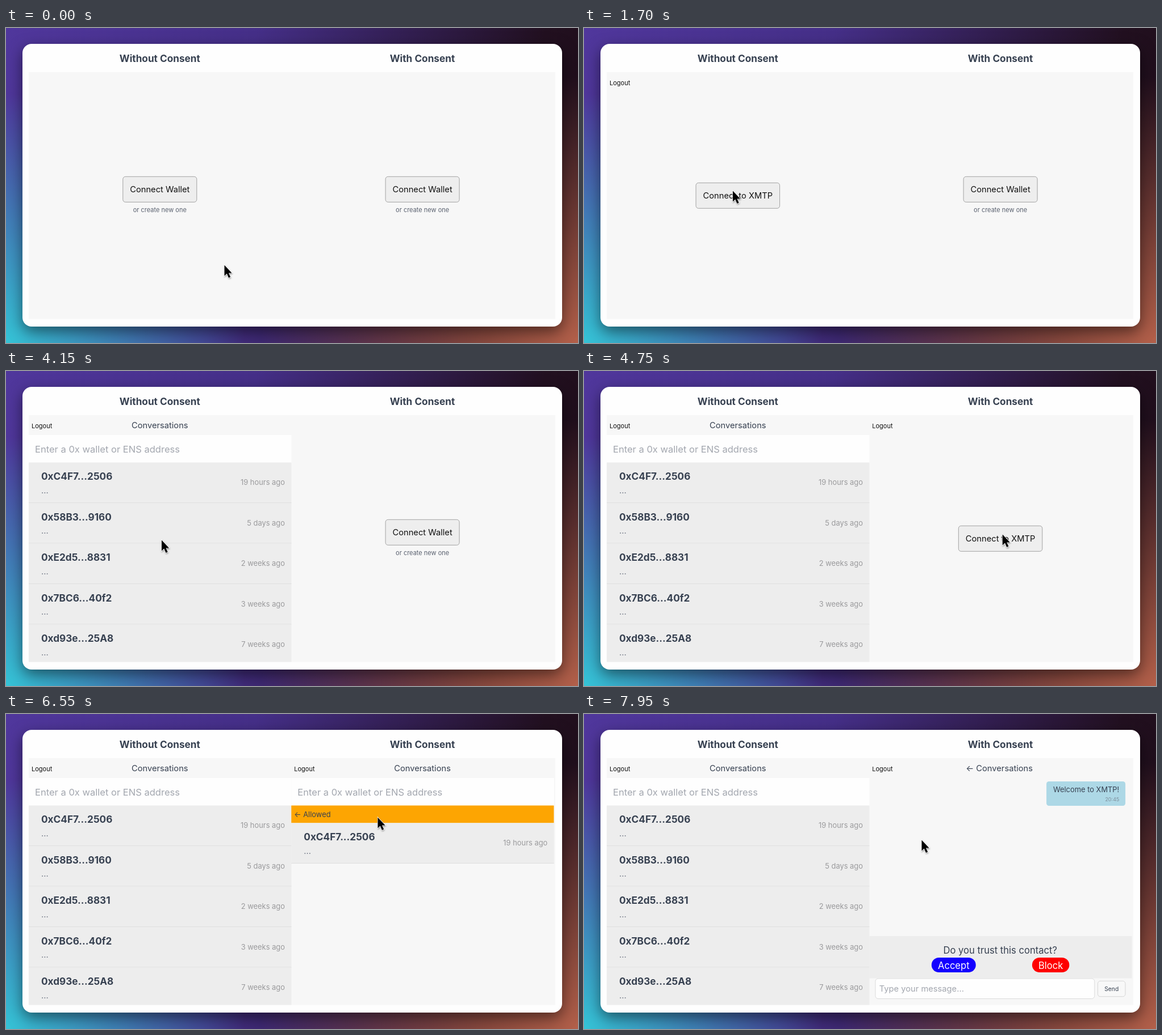
Write an HTML page that moves like this. It is 1007 px wide and 556 px high and loops after 8000 ms.

```html
<!DOCTYPE html>
<html lang="en">
<head>
<meta charset="utf-8">
<title>Consent demo</title>
<style>
  html, body { margin: 0; width: 100%; height: 100%; overflow: hidden; }
  body {
    background:
      radial-gradient(420px 440px at 0 100%, #35c3d6, #35c3d600),
      radial-gradient(560px 470px at 100% 100%, #b3604a, #b3604a00),
      linear-gradient(100deg, #50379c, #452f88 40%, #221020 86%, #1e0d18);
  }
  #card {
    position: absolute; left: 29px; top: 28px; width: 949.5px; height: 499px;
    border-radius: 16px; background: #fefefe;
    box-shadow: 0 9px 26px rgba(0, 0, 0, .5);
  }
  svg { position: absolute; left: 0; top: 0; font-family: Inter, sans-serif; }
</style>
</head>
<body>
<div id="card"></div>
<svg id="stage" width="1007" height="556" viewBox="0 0 1007 556"></svg>
<script>
const LOOP = 8000, STEP = 50, COLUMN = 462.3;
const INK = '#374151', GRAY = '#9a9a9c';
const addresses = ['0xC4F7...2506', '0x58B3...9160', '0xE2d5...8831', '0x7BC6...40f2', '0xd93e...25A8'];
const ages = ['19 hours', '5 days', '2 weeks', '3 weeks', '7 weeks'];

const text = (x, y, size, label, fill = INK, anchor = 'start', weight = 400) =>
  `<text x="${x}" y="${y}" font-size="${size}" fill="${fill}" text-anchor="${anchor}" font-weight="${weight}">${label}</text>`;
const rect = (x, y, w, h, fill, radius = 0, stroke = 'none') =>
  `<rect x="${x}" y="${y}" width="${w}" height="${h}" fill="${fill}" rx="${radius}" stroke="${stroke}"/>`;

// Views are drawn in left-column coordinates.
const logout = text(45, 101, 11, 'Logout', '#111');
const button = (y, w, label) =>
  rect(270.8 - w / 2, y, w, 45, '#eee', 4.5, '#a2a2a2') +
  text(270.8, y + 28, 14.7, label, '#111', 'middle');
const row = (y, i) =>
  rect(40, y, 462.5, 71.5, '#ededed') + rect(40, y + 70.5, 462.5, 1, '#dfdfdf') +
  text(62, y + 30.5, 17.2, addresses[i], INK, 'start', 700) +
  text(62, y + 54, 14.7, '...', '#6b7280') +
  text(491, y + 39.5, 12.9, ages[i] + ' ago', GRAY, 'end');
const listHeader = logout +
  text(270.8, 101, 14.7, 'Conversations', INK, 'middle') +
  rect(40, 113, 462.5, 49, '#fefefe') +
  text(51, 144, 16.55, 'Enter a 0x wallet or ENS address', '#a3a7af');
const banner = label => listHeader + rect(40, 161.5, 462.2, 30.8, '#fda502') +
  text(45, 181.5, 12.9, label);
const pill = (x, w, fill, label) =>
  rect(x, 430, w, 26, fill, 13) + text(x + w / 2, 449.5, 16.6, label, '#fff', 'middle');

const wallet = button(262.3, 130, 'Connect Wallet') +
  text(270.8, 325.3, 11, 'or create new one', '#5b6270', 'middle');
const connect = logout + button(273.3, 147.5, 'Connect to XMTP');
const inbox = listHeader + addresses.map((_, i) => row(161.5 + 71.5 * i, i)).join('');
const chat = logout +
  text(268.8, 101, 14.7, '← Conversations', INK, 'middle') +
  rect(351.8, 119, 139, 43, '#add8e6', 4.5) +
  text(480, 138.3, 12.9, 'Welcome to XMTP!', INK, 'end') +
  text(480, 153.5, 9, '20:45', '#7e8f9c', 'end') +
  rect(40, 392, 462.3, 74.5, '#ededed') +
  text(270.4, 423, 16.6, 'Do you trust this contact?', INK, 'middle') +
  pill(149.5, 78, '#1400ff', 'Accept') + pill(326.6, 65.5, '#fe0000', 'Block') +
  rect(50.7, 467, 385.8, 35.5, '#fefefe', 5, '#dcdcdc') +
  text(57.5, 490.2, 14.7, 'Type your message...', '#a3a7af') +
  rect(442.2, 471.3, 48.5, 27.5, '#f8f8f8', 4.5, '#d6d6d6') +
  text(466.4, 488.7, 10.3, 'Send', INK, 'middle');

// [start time, column, view]
const views = [
  [0, 0, wallet], [1000, 0, connect], [3450, 0, inbox],
  [0, 1, wallet], [4750, 1, connect], [5250, 1, banner('Requests →')],
  [6200, 1, banner('← Allowed') + row(192.5, 0)], [7250, 1, chat]
];

// [time, x, y] of the pointer tip
const pointer = [
  [0, 384, 418], [150, 383, 416], [750, 264, 286], [1700, 261.5, 287],
  [2200, 261, 301], [3550, 261, 301], [4150, 273.5, 298], [4650, 736, 288],
  [5400, 741.5, 288.5], [5950, 655, 183], [6550, 654, 182],
  [6900, 612, 226], [7600, 610, 228], [7950, 594, 222]
];

const stage = document.getElementById('stage');
stage.innerHTML = `
  <clipPath id="panel"><rect x="40" y="78" width="927" height="435.5"/></clipPath>
  <filter id="shadow" x="-50%" y="-50%" width="200%" height="200%">
    <feDropShadow dx="0.5" dy="1.5" stdDeviation="1.2" flood-opacity=".4"/></filter>
  ${text(270.8, 60, 17.2, 'Without Consent', INK, 'middle', 700)}
  ${text(733, 60, 17.2, 'With Consent', INK, 'middle', 700)}
  <g clip-path="url(#panel)">${rect(40, 78, 927, 436, '#f7f7f7')}
  ${views.map(([, col, body]) => `<g class="view" transform="translate(${col * COLUMN})">${body}</g>`).join('')}</g>
  <path id="cursor" d="M0.5 0.5V19.5L4.8 15.6L8 23L11.2 21.6L8 14.4H13.6Z"
    stroke="#fff" stroke-width="1.3" paint-order="stroke" filter="url(#shadow)"/>`;
const groups = stage.querySelectorAll('.view');
const cursor = document.getElementById('cursor');

function pointerAt(t) {
  const i = Math.max(1, pointer.findIndex(p => p[0] >= t));
  const [t0, x0, y0] = pointer[i - 1], [t1, x1, y1] = pointer[i];
  const u = (t - t0) / (t1 - t0), k = u * u * (3 - 2 * u);
  return [x0 + (x1 - x0) * k, y0 + (y1 - y0) * k];
}

function draw() {
  const t = Math.floor(performance.now() % LOOP / STEP) * STEP;
  views.forEach(([start, col], i) => {
    const next = views[i + 1];
    const end = next && next[1] === col ? next[0] : LOOP;
    groups[i].style.display = t >= start && t < end ? '' : 'none';
  });
  cursor.setAttribute('transform', `translate(${pointerAt(t)})`);
  requestAnimationFrame(draw);
}
draw();
</script>
</body>
</html>
```
